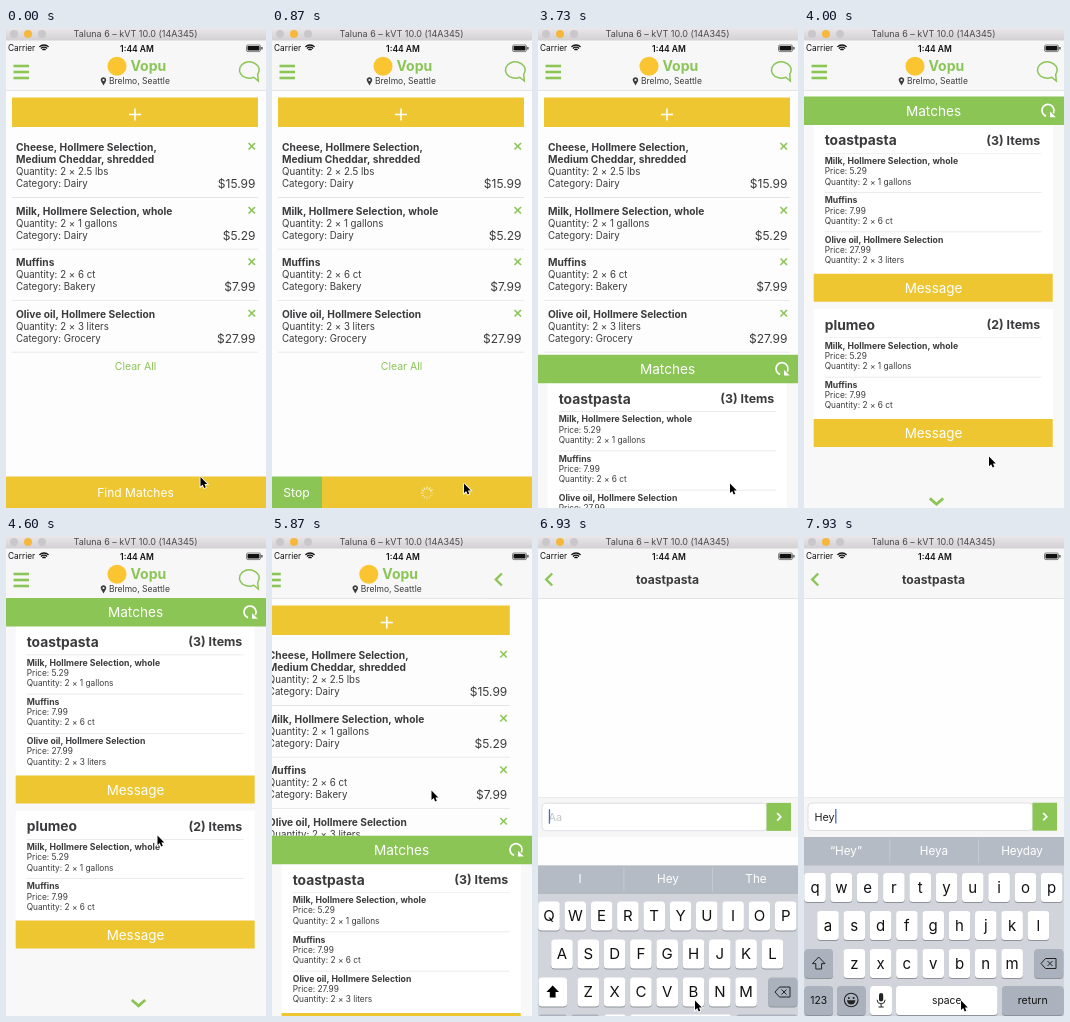
Animation of 260x480 px, one loop 8000 ms. Source, as an HTML page with a canvas:

```html
<!DOCTYPE html>
<html lang="en">
<head>
<meta charset="utf-8">
<title>Shopping matches</title>
<style>
  html, body { margin: 0; width: 100%; height: 100%; overflow: hidden; background: #fdfdfd; }
  canvas { display: block; width: 260px; height: 480px; }
</style>
</head>
<body>
<canvas id="stage"></canvas>
<script>
const W = 260, H = 480, LOOP = 8000;
const GREEN = '#8bc556', YELLOW = '#edc632', INK = '#3b3b3d', BAR = '#f7f7f7', LINE = '#e4e4e6';
const BRAND = 'Hollmere Selection', USER = 'toastpasta';
const MILK = `Milk, ${BRAND}, whole`, OIL = `Olive oil, ${BRAND}`;

const canvas = document.getElementById('stage');
const ctx = canvas.getContext('2d');
const dpr = window.devicePixelRatio || 1;
canvas.width = W * dpr;
canvas.height = H * dpr;

const clamp = v => Math.max(0, Math.min(1, v));
const smooth = v => { v = clamp(v); return v * v * (3 - 2 * v); };
// Critically damped spring from 0 to 1, started at time `from` (ms).
function spring(t, from, w = 18) {
  const x = Math.max(0, t - from) / 1000 * w;
  return 1 - (1 + x) * Math.exp(-x);
}

function rect(x, y, w, h, color, r = 0) {
  ctx.fillStyle = color;
  ctx.beginPath();
  if (r) ctx.roundRect(x, y, w, h, r); else ctx.rect(x, y, w, h);
  ctx.fill();
}
function circle(x, y, r, color) {
  ctx.fillStyle = color;
  ctx.beginPath();
  ctx.arc(x, y, r, 0, 7);
  ctx.fill();
}
function trace(pts) {
  ctx.beginPath();
  pts.forEach(([x, y], i) => i ? ctx.lineTo(x, y) : ctx.moveTo(x, y));
}
function stroke(color, width) {
  ctx.strokeStyle = color;
  ctx.lineWidth = width;
  ctx.stroke();
}
function line(pts, color, width) {
  trace(pts);
  stroke(color, width);
}
function shape(pts, color) {
  trace(pts);
  ctx.closePath();
  ctx.fillStyle = color;
  ctx.fill();
}
// y is the middle of the capitals.
function text(s, x, y, size, color = INK, align = 'left', weight = 400) {
  ctx.font = `${weight} ${size}px Inter, "Open Sans", sans-serif`;
  ctx.textAlign = align;
  ctx.fillStyle = color;
  ctx.fillText(s, x, y + size * 0.36);
}
function shifted(x, y, draw) {
  ctx.save();
  ctx.translate(x, y);
  draw();
  ctx.restore();
}
function faded(alpha, draw) {
  ctx.save();
  ctx.globalAlpha *= alpha;
  draw();
  ctx.restore();
}

function windowBar() {
  const g = ctx.createLinearGradient(0, 0, 0, 12);
  g.addColorStop(0, '#e9e7e9');
  g.addColorStop(1, '#d3d1d3');
  rect(0, 0, W, 12.5, g);
  circle(8, 6, 4, '#c9c7c9');
  circle(22, 6, 4, '#f6b73e');
  circle(36, 6, 4, '#c9c7c9');
  text('Taluna 6 – kVT 10.0 (14A345)', 129.5, 6, 9, '#4a484a', 'center');
}

function statusBar() {
  text('Carrier', 2, 20.5, 8.3, '#111');
  for (const r of [2.2, 4.4, 6.6]) {
    ctx.beginPath();
    ctx.arc(38, 23.6, r, -2.35, -0.79);
    stroke('#111', 1.3);
  }
  text('1:44 AM', 131, 20.5, 8.5, '#111', 'center', 600);
  ctx.beginPath();
  ctx.roundRect(240.5, 17, 14, 6.6, 1.5);
  stroke('#333', 0.6);
  rect(241.5, 18, 12, 4.6, '#111', 0.8);
  rect(255.3, 19, 1.2, 2.6, '#333');
}

function topBar() {
  rect(0, 12, W, 50.5, BAR);
  rect(0, 62, W, 0.7, '#dcdcde');
}

function listHeader() {
  topBar();
  for (const y of [38, 44, 50]) rect(7.5, y - 1.3, 15.5, 2.6, GREEN);
  circle(111, 38.3, 9.5, '#fbc531');
  text('Vopu', 124.5, 38, 14, GREEN, 'left', 700);
  ctx.beginPath();
  ctx.arc(97.5, 52, 2.7, 2.7, 0.44);
  ctx.lineTo(97.5, 57.5);
  ctx.fillStyle = INK;
  ctx.fill();
  circle(97.5, 52, 1.1, BAR);
  text('Brelmo, Seattle', 103, 53.3, 8.5);
  ctx.beginPath();
  ctx.ellipse(243.3, 42, 9.8, 8.2, 0, 1.09, 0.54 + 2 * Math.PI);
  ctx.lineTo(252.3, 53);
  ctx.closePath();
  stroke(GREEN, 1.5);
}

const items = [
  [119, [`Cheese, ${BRAND},`, 'Medium Cheddar, shredded'], '2.5 lbs', 'Dairy', '$15.99'],
  [183, [MILK], '1 gallons', 'Dairy', '$5.29'],
  [234.5, ['Muffins'], '6 ct', 'Bakery', '$7.99'],
  [286, [OIL], '3 liters', 'Grocery', '$27.99']
];

function listItem([y, names, amount, kind, price]) {
  names.forEach((n, i) => text(n, 10, y + 12 * i, 10.2, INK, 'left', 700));
  const q = y + 12.3 * names.length;
  text(`Quantity: 2 × ${amount}`, 10, q, 9.7);
  text(`Category: ${kind}`, 10, q + 12, 9.7);
  text(price, 249.5, q + 12, 12, INK, 'right');
  line([[242.5, y - 4], [249, y + 2.5]], GREEN, 1.6);
  line([[249, y - 4], [242.5, y + 2.5]], GREEN, 1.6);
  rect(6, q + 25.5, 246, 0.8, LINE);
}

function spinner(x, y, step) {
  for (let i = 0; i < 12; i++) {
    const a = i * Math.PI / 6, c = Math.cos(a), s = Math.sin(a);
    const glow = ((i - step) % 12 + 12) % 12 / 11;
    line([[x + 3.6 * c, y + 3.6 * s], [x + 6.4 * c, y + 6.4 * s]], `rgba(255,255,255,${0.25 + 0.6 * glow})`, 1.1);
  }
}

function bottomBar(t) {
  rect(0, 448.5, W, 32, '#fff');
  if (t < 800) {
    faded(t < 670 ? 1 : 0.6, () => {
      rect(0, 448.5, W, 32, YELLOW);
      text('Find Matches', 129.5, 465, 12, '#fff', 'center');
    });
    return;
  }
  rect(0, 448.5, 50, 32, GREEN);
  text('Stop', 24.5, 465, 12.2, '#fff', 'center');
  const pressed = t < 870 || (t >= 3470 && t < 3730);
  faded(pressed ? 0.75 : 1, () => {
    rect(50, 448.5, W - 50, 32, YELLOW);
    spinner(155, 465, Math.floor(clamp((t - 2200) / 670) * 10));
  });
}

function listPage(t) {
  rect(0, 12, W, H, '#fdfdfd');
  listHeader();
  rect(6, 69.5, 246, 29.5, YELLOW);
  line([[123, 86.5], [135, 86.5]], '#fff', 1.6);
  line([[129, 80.5], [129, 92.5]], '#fff', 1.6);
  items.forEach(listItem);
  text('Clear All', 129.5, 338.5, 10.5, GREEN, 'center');
  bottomBar(t);
}

const wanted = [[MILK, '5.29', '1 gallons'], ['Muffins', '7.99', '6 ct'], [OIL, '27.99', '3 liters']];

function matchCard(top, user, count, pressed) {
  const rows = top + 36.5, step = 39.3;
  const button = rows + step * count - 5;
  rect(9.7, top, 239, button - top, '#fff');
  text(user, 20.7, top + 16, 13.8, INK, 'left', 700);
  text(`(${count}) Items`, 236.3, top + 16, 12.4, INK, 'right', 700);
  wanted.slice(0, count).forEach(([name, price, amount], i) => {
    const y = rows + step * i;
    rect(20.7, y - 8, 217, 0.7, LINE);
    text(name, 20.7, y, 8.7, INK, 'left', 700);
    text(`Price: ${price}`, 20.7, y + 10.3, 8.3);
    text(`Quantity: 2 × ${amount}`, 20.7, y + 20.6, 8.3);
  });
  faded(pressed ? 0.5 : 1, () => {
    rect(9.7, button, 239, 28, YELLOW);
    text('Message', 129.5, button + 14.3, 13.4, '#fff', 'center');
  });
}

function matchPanel(t) {
  rect(0, 0, W, 420, '#f8f8f8');
  matchCard(28, USER, 3, t >= 5670 && t < 5764);
  matchCard(212.5, 'plumeo', 2, false);
  rect(0, 0, W, 28.5, GREEN);
  text('Matches', 129.5, 14.3, 13.6, '#fff', 'center');
  ctx.beginPath();
  ctx.arc(244, 14, 6, 1.9, 0.5 + 2 * Math.PI);
  stroke('#fff', 1.7);
  shape([[246, 15.2], [251.8, 20.8], [246, 20.8]], '#fff');
  line([[125.8, 402], [132.5, 407.8], [139.2, 402]], GREEN, 2.8);
}

function typed(t) {
  return 'Hey'.slice(0, [7270, 7470, 7670].filter(k => t >= k).length);
}

function inputBar(t) {
  rect(0, 261, W, 40, '#f6f6f7');
  rect(0, 261, W, 0.7, '#e9e9eb');
  rect(4, 267, 225, 27.5, '#fff', 4);
  ctx.beginPath();
  ctx.roundRect(4, 267, 225, 27.5, 4);
  stroke('#d9d9dd', 0.8);
  rect(228.5, 266.7, 24.5, 28, GREEN);
  line([[239.2, 277], [242.8, 280.7], [239.2, 284.4]], '#fff', 1.7);
  const word = typed(t);
  text(word || 'Aa', 10.5, 280.7, 10.8, word ? '#222' : '#c3c5cb');
  if (t > 6748) {
    const x = word ? 11 + ctx.measureText(word).width : 10.8;
    rect(x, 273, 1.3, 14.5, '#4a69c8');
  }
}

function chatPage(t, bodyAlpha) {
  faded(bodyAlpha, () => {
    rect(0, 62, W, H, '#fefefe');
    shifted(0, 179 * (1 - spring(t, 6748, 50)), () => inputBar(t));
  });
  topBar();
  line([[14.2, 37.5], [8.2, 43.5], [14.2, 49.5]], GREEN, 2.4);
  text(USER, 129.5, 43.5, 12.1, INK, 'center', 700);
}

function key(x, y, w, label, size = 15, dark = false) {
  rect(x, y + 1, w, 29, '#8e939b', 3.5);
  rect(x, y, w, 29, dark ? '#abb2bd' : '#fff', 3.5);
  if (label) text(label, x + w / 2, y + 14.5, size, '#111', 'center');
}

const hints = [['I', 'Hey', 'The'], ['“H”', 'Hey', 'How'], ['“He”', 'Hey', 'Her'], ['“Hey”', 'Heya', 'Heyday']];
const rows = [['qwertyuiop', 11], ['asdfghjkl', 24], ['zxcvbnm', 50.3]];

// Drawn with its top edge at y = 0.
function keyboard(t) {
  const n = typed(t).length, upper = n === 0;
  rect(0, 0, W, 180, '#d1d5db');
  rect(0, 0, W, 28.5, '#b5bbc4');
  for (const x of [85.5, 174]) rect(x, 2, 0.8, 24, '#c9cdd4');
  hints[n].forEach((h, i) => text(h, 42 + 88 * i, 13.5, 11.7, '#fff', 'center'));

  rows.forEach(([letters, x0], r) => {
    [...letters].forEach((c, i) =>
      key(x0 + 26.3 * i - 10.8, 36 + 38 * r, 21.6, upper ? c.toUpperCase() : c));
  });

  key(0.5, 112, 28.5, '', 0, !upper);
  const arrow = [[14.7, 120], [21, 126.6], [17.6, 126.6], [17.6, 132], [11.8, 132], [11.8, 126.6], [8.4, 126.6]];
  if (upper) shape(arrow, '#000');
  else line([...arrow, arrow[0]], '#222', 1);

  key(230.3, 112, 29, '', 0, true);
  line([[237, 126.5], [241.5, 121.5], [252, 121.5], [252, 131.5], [241.5, 131.5], [237, 126.5]], '#222', 1);
  line([[243.5, 124], [248.5, 129]], '#222', 1);
  line([[248.5, 124], [243.5, 129]], '#222', 1);

  key(0.5, 149, 28.5, '123', 10.3, true);
  key(33, 149, 28.5, '', 0, true);
  ctx.beginPath();
  ctx.arc(47.2, 163, 6.8, 0, 7);
  stroke('#222', 1.1);
  circle(44.8, 161, 1, '#222');
  circle(49.6, 161, 1, '#222');
  ctx.beginPath();
  ctx.arc(47.2, 163.3, 4.2, 0, Math.PI);
  ctx.fillStyle = '#222';
  ctx.fill();

  key(66, 149, 22, '');
  rect(75, 156, 4.2, 8.5, '#222', 2.1);
  ctx.beginPath();
  ctx.arc(77.1, 162.8, 4, 0, Math.PI);
  stroke('#222', 1);
  line([[77.1, 167], [77.1, 170]], '#222', 1);
  line([[74.5, 170], [79.7, 170]], '#222', 1);

  key(92, 149, 101.5, 'space', 10.3);
  key(198, 149, 61.5, 'return', 10.5, true);
}

// start, end, x, y: pointer travels to (x, y) in that span.
const moves = [
  [70, 400, 192, 455.5],
  [3800, 4560, 151.5, 299.5],
  [4600, 5270, 159.5, 254.5],
  [5900, 6400, 157, 464.5]
];

function pointer(t) {
  let x = 194.5, y = 449;
  for (const [a, b, px, py] of moves) {
    const k = smooth((t - a) / (b - a));
    x += (px - x) * k;
    y += (py - y) * k;
  }
  const tip = [[0, 0], [0, 9.6], [2.2, 7.6], [3.7, 11], [5.3, 10.3], [3.9, 7], [6.8, 7]];
  shifted(x, y, () => {
    line([...tip, tip[0]], '#fff', 1.6);
    shape(tip, '#000');
  });
}

function draw(t) {
  ctx.setTransform(dpr, 0, 0, dpr, 0, 0);
  rect(0, 0, W, H, '#fdfdfd');
  const push = smooth((t - 5724) / 560);
  if (push < 1) shifted(-0.32 * W * push, 0, () => listPage(t));
  if (push > 0) shifted(W * (1 - push), 0, () => chatPage(t, clamp((push - 0.2) / 0.3)));

  const panelY = H - 418 * (spring(t, 3659.8) - spring(t, 5765));
  if (panelY < H - 0.1) shifted(0, panelY, () => matchPanel(t));
  if (t > 6748) shifted(0, H - 179 * spring(t, 6748), () => keyboard(t));

  statusBar();
  windowBar();
  pointer(t);
}

const start = performance.now();
function tick() {
  draw((performance.now() - start) % LOOP);
  requestAnimationFrame(tick);
}
tick();
</script>
</body>
</html>
```
